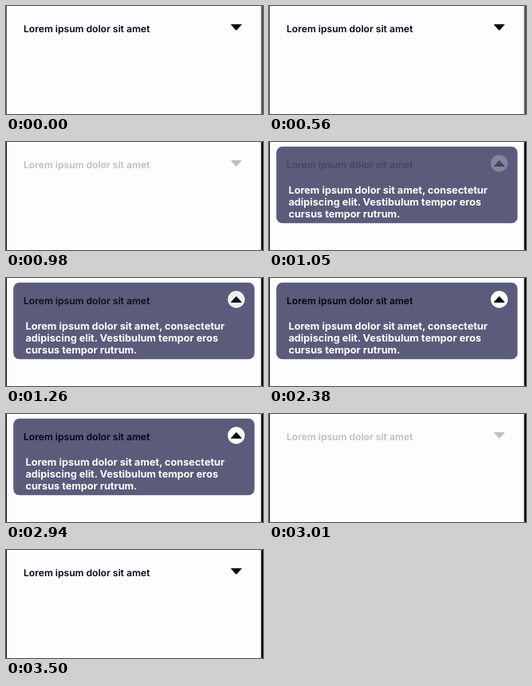
Write an HTML page that moves like this. It is 322x136 px and loops after 4130 ms.

```html
<!DOCTYPE html>
<html lang="en">
<head>
<meta charset="utf-8">
<title>Accordion</title>
<style>
html, body { margin: 0; width: 100%; height: 100%; overflow: hidden; background: #fdfdff; }
svg { display: block; width: 100vw; height: 100vh; }
text { font-family: Inter, "Liberation Sans", sans-serif; font-weight: 600; text-rendering: geometricPrecision; }
#body text { font-weight: 700; }
</style>
</head>
<body>
<svg viewBox="0 0 322 136">
  <rect width="322" height="136" fill="#fdfdff"/>
  <g id="edges">
    <rect width="1" height="136"/>
    <rect x="319.6" width="2.4" height="136"/>
  </g>
  <g id="panel">
    <rect x="9.2" y="5.7" width="302.2" height="96.6" rx="7.5" fill="#5b5b7b"/>
    <g id="body" font-size="12.7" fill="#fff">
      <text x="24.5" y="64.5">Lorem ipsum dolor sit amet, consectetur</text>
      <text x="24.5" y="80">adipiscing elit. Vestibulum tempor eros</text>
      <text x="24.5" y="95.3">cursus tempor rutrum.</text>
    </g>
  </g>
  <g id="header" fill="#050510">
    <text x="22" y="33" font-size="12.1">Lorem ipsum dolor sit amet</text>
    <circle id="disc" cx="288.5" cy="27" r="10.7" fill="#fff"/>
    <path id="arrow" d="M282.2 23.4H294.8L288.5 30.4Z" stroke="#050510" stroke-width="1" stroke-linejoin="round"/>
  </g>
</svg>
<script>
const LOOP = 4130, STEP = 70, DIM = 0.25;
const OPEN = 1050, CLOSE = 3010;
const $ = id => document.getElementById(id);
const clamp = x => Math.min(1, Math.max(0, x));
const ease = x => x < 0.5 ? 2 * x * x : 1 - 2 * (1 - x) ** 2;
const show = (id, on) => $(id).setAttribute("visibility", on ? "visible" : "hidden");

// Dims while pressed, then returns to full strength.
function press(t, down, up) {
  if (t < down) return 1;
  if (t < up) return 1 - (1 - DIM) * ease(clamp((t - down + STEP) / 140));
  return DIM + (1 - DIM) * ease(clamp((t - up) / 280));
}

function draw(time) {
  const t = Math.floor(time % LOOP / STEP) * STEP;
  const open = t >= OPEN && t < CLOSE;
  show("panel", open);
  show("disc", open);
  $("arrow").setAttribute("transform", open ? "rotate(180 288.5 26.9)" : "");
  $("header").setAttribute("opacity", t < 2000 ? press(t, 910, OPEN) : press(t, CLOSE, CLOSE));
  $("edges").setAttribute("fill", t < 910 ? "#55555c" : "#08080c");
}

function tick() {
  draw(performance.now());
  requestAnimationFrame(tick);
}
tick();
</script>
</body>
</html>
```
